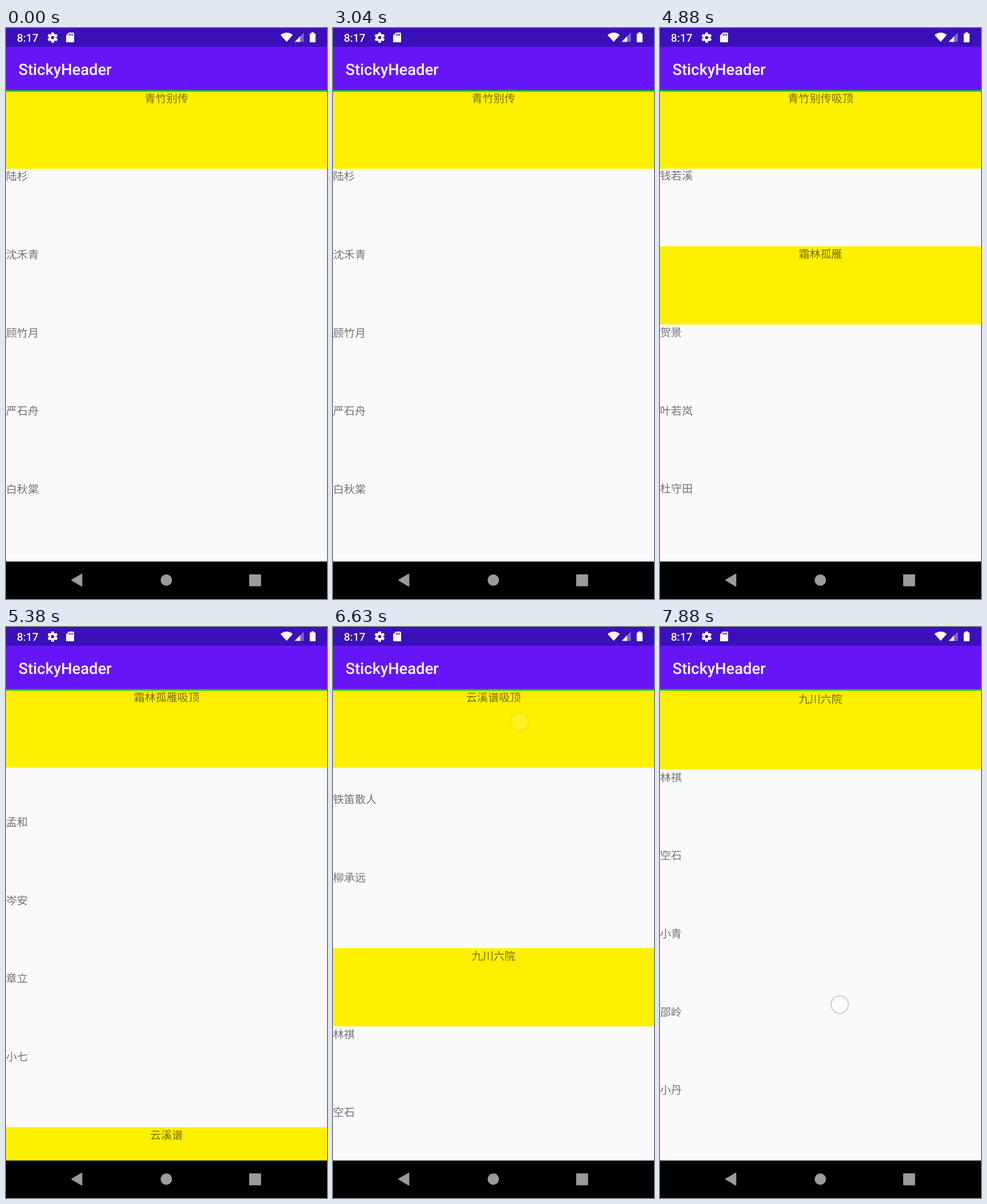
Recreate the animation shown at these times as an HTML page. Size 561 px wide and 998 px high, loop 8000 ms.

```html
<!DOCTYPE html>
<html lang="zh-CN">
<head>
<meta charset="utf-8">
<title>StickyHeader</title>
<style>
  html, body { margin: 0; width: 100%; height: 100%; overflow: hidden; background: #fafafa; }
  svg { display: block; width: 561px; height: 998px; text-rendering: geometricPrecision; }
  .list text { font: 400 19.1px "Noto Sans CJK SC", "Noto Sans CJK", sans-serif; fill: #000; fill-opacity: .54; }
  .bar text { font-family: Roboto, sans-serif; font-weight: 500; fill: #fff; }
</style>
</head>
<body>
<svg viewBox="0 0 561 998">
  <rect width="561" height="998" fill="#fafafa"/>
  <g class="list" id="list"></g>
  <g class="bar">
    <rect width="561" height="109" fill="#6616f6"/>
    <rect width="561" height="32.7" fill="#3b0fba"/>
    <rect y="108.6" width="561" height="2.700" fill="#12c81a"/>
    <text x="19" y="23.800" font-size="19.1">8:17</text>
    <text x="21.800" y="81.500" font-size="27.300">StickyHeader</text>
    <g id="gear" transform="translate(81.5 16.7)" fill="#fff">
      <circle r="4.7" fill="none" stroke="#fff" stroke-width="3.8"/>
    </g>
    <path d="M110 8h7.5q1.5 0 1.5 1.5v14q0 1.5-1.5 1.5h-11q-1.5 0-1.5-1.5V13z" fill="#fff"/>
    <path d="M110.6 10v3.6m2.9-3.6v3.6m2.9-3.6v3.6" stroke="#3b0fba" stroke-width="1.5"/>
    <path d="M479.8 12.2Q490.5 3.8 501.2 12.2L490.5 24.2Z" fill="#fff"/>
    <path d="M520.5 8v16.2H504.5z" fill="#fff" fill-opacity=".35"/>
    <path d="M514 14.6v9.6H504.5z" fill="#fff"/>
    <path d="M533.7 7.6h4.4v2h1.8q1.1 0 1.1 1.1v13.2q0 1.1-1.1 1.1h-8q-1.1 0-1.1-1.1V10.7q0-1.1 1.1-1.1h1.8z" fill="#fff"/>
  </g>
  <rect y="932.5" width="561" height="66" fill="#000"/>
  <g fill="#9b9b9b" stroke="#9b9b9b" stroke-width="2" stroke-linejoin="round">
    <path d="M115 965L132.3 954.8V975.2Z"/>
    <circle cx="280.2" cy="965" r="9"/>
    <rect x="426" y="956" width="18.8" height="18.8"/>
  </g>
  <circle id="touch" r="15.2" fill="#fff" fill-opacity=".58" stroke="#4a3cb0" stroke-opacity=".32" stroke-width="2"/>
</svg>
<script>
const LOOP = 8000, TICK = 1000 / 24;
const ROW = 136.7, TOP = 109.1, BOTTOM = 933, MID = 280.5;
const $ = id => document.getElementById(id);

const sections = [
  ["青竹别传", "陆杉 沈禾青 顾竹月 严石舟 白秋棠 宋玉川 钱若溪"],
  ["霜林孤雁", "贺景 叶若岚 杜守田 罗云帆 孟和 岑安 章立 小七"],
  ["云溪谱", "江舟 何笛 柳蕙 卜册 方鸣谷 方珏 铁笛散人 柳承远"],
  ["九川六院", "林祺 空石 小青 邵岭 小丹"]
];

// [time, scroll offset]
const scrollKeys = [
  [4190, 0], [4375, 257.6], [4500, 520], [4760, 780], [4980, 865],
  [5160, 1270], [5375, 1558.7], [5665, 1740], [5875, 2361.1], [6120, 2610],
  [6440, 2745], [6625, 3102], [6880, 3350], [7250, 3515], [7650, 3551]
];

// [start, x, y, end, x, y, opacity at start, opacity at end]
const swipes = [
  [4160, 318, 500, 4375, 326, 142, 1, 1],
  [4955, 322, 610, 5165, 342, 130, 1, .8],
  [5650, 326, 650, 5875, 354, 96, 1, 1],
  [6420, 312, 570, 6625, 326, 166, 1, .22],
  [7870, 314, 660, 8000, 314, 660, .8, .8]
];

function el(name, attrs, parent, text) {
  const node = document.createElementNS("http://www.w3.org/2000/svg", name);
  for (const k in attrs) node.setAttribute(k, attrs[k]);
  if (text) node.textContent = text;
  parent.appendChild(node);
  return node;
}

function addRow(label, isHeader) {
  const g = el("g", {}, $("list"));
  if (isHeader) el("rect", { width: 561, height: ROW, fill: "#fff000" }, g);
  const pos = isHeader ? { x: MID, "text-anchor": "middle" } : { x: 0 };
  el("text", { ...pos, y: 20.5 }, g, label);
  return g;
}

const rows = [], headers = [];
for (const [title, names] of sections) {
  headers.push({ title, index: rows.length });
  rows.push(addRow(title, true));
  for (const name of names.split(" ")) rows.push(addRow(name, false));
}
const sticky = addRow(sections[0][0], true);
const stickyText = sticky.querySelector("text");

for (let a = 0; a < 360; a += 60)
  el("path", { d: "M-2-9h4l1 4h-6z", transform: `rotate(${a})` }, $("gear"));

const moveY = (node, y) => node.setAttribute("transform", `translate(0 ${y.toFixed(2)})`);

// Monotone cubic through the scroll keys
const slope = i => {
  const [a, b] = [scrollKeys[i], scrollKeys[i + 1]];
  return a && b ? (b[1] - a[1]) / (b[0] - a[0]) : 0;
};
const tangent = i => {
  const p = slope(i - 1), q = slope(i);
  return p * q > 0 ? 2 * p * q / (p + q) : 0;
};
function scrollAt(t) {
  const last = scrollKeys.length - 1;
  if (t <= scrollKeys[0][0]) return 0;
  if (t >= scrollKeys[last][0]) return scrollKeys[last][1];
  const i = scrollKeys.findIndex(k => k[0] > t) - 1;
  const [t0, a] = scrollKeys[i], [t1, b] = scrollKeys[i + 1];
  const d = t1 - t0, u = (t - t0) / d, v = 1 - u;
  return a * v * v * (1 + 2 * u) + b * u * u * (3 - 2 * u)
    + d * u * v * (v * tangent(i) - u * tangent(i + 1));
}

// The screen refreshes unevenly: on ticks 0, 1 and 3 of every six
function heldTime(t) {
  const tick = Math.floor(t / TICK + .1), m = tick % 6;
  return (tick - m + (m > 2 ? 3 : Math.min(m, 1))) * TICK;
}

function drawTouch(t) {
  const s = swipes.find(s => t >= s[0] && t <= s[3] + 10);
  $("touch").style.display = s ? "" : "none";
  if (!s) return;
  const u = Math.min(1, (t - s[0]) / (s[3] - s[0]));
  const mix = (a, b) => a + (b - a) * u;
  $("touch").setAttribute("cx", mix(s[1], s[4]));
  $("touch").setAttribute("cy", mix(s[2], s[5]));
  $("touch").setAttribute("opacity", u < .9 ? s[6] : s[7]);
}

function draw(time) {
  const t = heldTime(time), scroll = scrollAt(t);
  rows.forEach((row, i) => {
    const y = TOP + i * ROW - scroll;
    row.style.display = y > -ROW && y < BOTTOM ? "" : "none";
    moveY(row, y);
  });

  const current = headers.filter(h => h.index * ROW <= scroll).pop();
  const next = headers[headers.indexOf(current) + 1];
  const push = next ? Math.min(0, (next.index - 1) * ROW - scroll) : 0;
  moveY(sticky, TOP + push);
  const label = current.title + (scroll > current.index * ROW ? "吸顶" : "");
  if (stickyText.textContent !== label) stickyText.textContent = label;

  drawTouch(t);
}

function frame() {
  draw(performance.now() % LOOP);
  requestAnimationFrame(frame);
}
frame();
</script>
</body>
</html>
```
